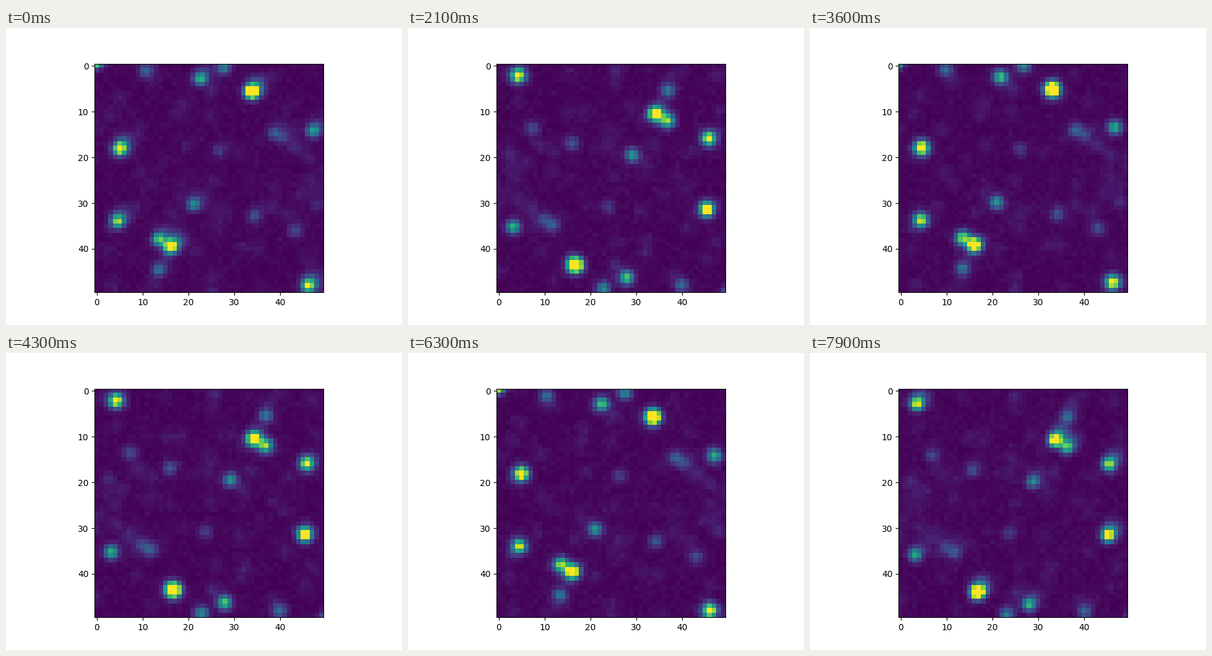
Recreate the animation shown at these times as a matplotlib script. Size 640 by 480 pixels, loop 8000 ms.

```python
import numpy as np
import matplotlib.pyplot as plt
from matplotlib.animation import FuncAnimation

SIZE = 50
FRAMES = 80
MID = 25
DRIFT = 21.4   # frames per swing of the pointing
NOISY = 54

# Main stars, brightest first; brightness falls off with rank
STARS = np.array([
    (32.8, 4.9), (-1.5, -1.4), (16.1, 39), (4.4, 17.8), (46.4, 47), (4.4, 33.7),
    (13.5, 37.5), (21.5, 2.3), (46.5, 13.2), (20.9, 29.7), (26.5, -.2),
    (13.6, 44.2), (9.5, .8), (38, 13.8), (34.2, 32.1), (43, 35.3), (40, 15),
    (26, 18),
])
peaks = 1.9 * np.exp(-.145 * np.arange(len(STARS)))

rng = np.random.default_rng(4)
faint = rng.uniform(-1, 51, (70, 2))
sky = np.vstack([STARS, faint])
flux = np.append(peaks, rng.uniform(.02, .06, len(faint)))
grid = np.arange(SIZE)


def is_flipped(n):
    return 6 <= n % 32 < 26


def star_places(n):
    swing = .5 + .5 * np.cos(2 * np.pi * n / DRIFT)
    roll = .028 * swing
    x, y = sky.T
    shift = .66 * swing
    if is_flipped(n):
        x, y = 49.6 - x, 49.15 - .978 * y
        shift = -shift
    return (x + .4 * swing - roll * (y - MID),
            y + shift + .6 * roll * (x - MID))


def tail(n):
    """Offset of the blurred tail: fades mid-loop while it turns."""
    turn = 2 * np.pi * n / FRAMES
    length = 1.7 * max(0, np.cos(turn))
    angle = 2 * turn - np.pi / 4
    return length * np.cos(angle), length * np.sin(angle)


def blobs(x, y, peak, sigma):
    gx = np.exp(-(grid - x[:, None]) ** 2 / (2 * sigma ** 2))
    gy = np.exp(-(grid - y[:, None]) ** 2 / (2 * sigma ** 2))
    return (gy * peak[:, None]).T @ gx


def exposure(n):
    rng = np.random.default_rng(100 + n)
    x, y = star_places(n)
    tx, ty = tail(n)
    img = blobs(x, y, .87 * flux, .98) + blobs(x + tx, y + ty, .2 * flux, 1.4)
    level, spread = (.098, .04) if n == NOISY else (.014, .01)
    return img + np.clip(rng.normal(level, spread, img.shape), 0, None)


fig, ax = plt.subplots(figsize=(6.4, 4.8), dpi=100)
image = ax.imshow(exposure(0), cmap="viridis", vmin=0, vmax=1,
                  interpolation="nearest")


def update(n):
    image.set_data(exposure(n))
    return [image]


anim = FuncAnimation(fig, update, frames=FRAMES, interval=100,
                     repeat=True, repeat_delay=0)
plt.show()
```
